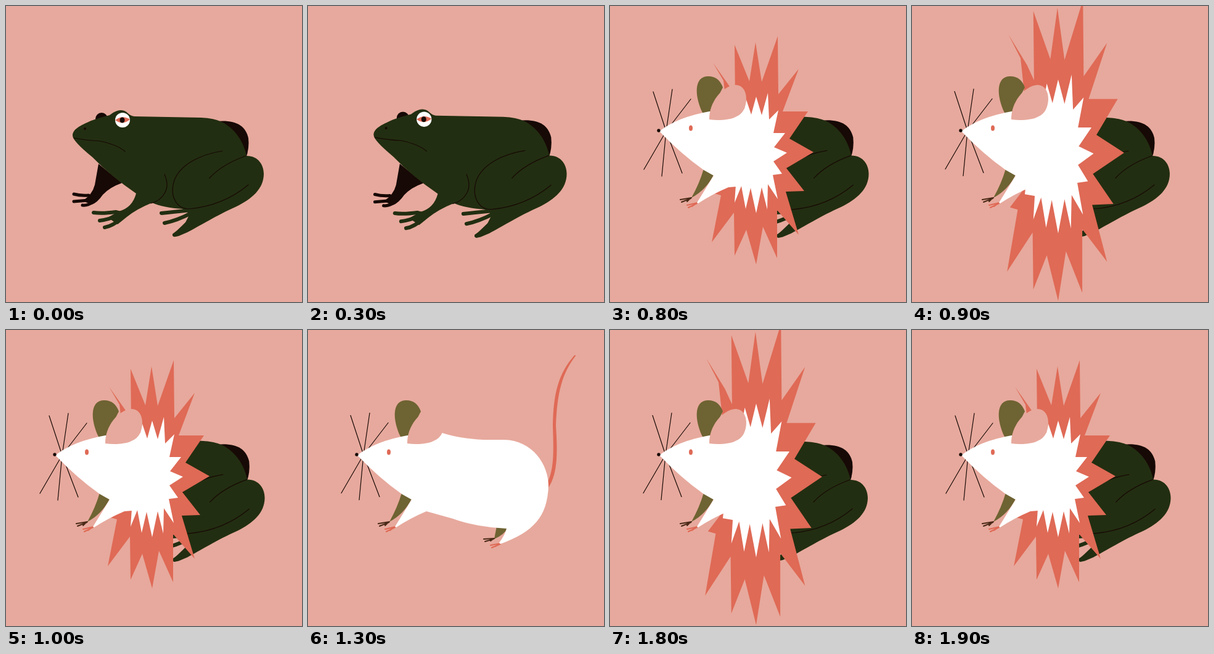
Write an HTML page that moves like this. It is 480 px wide and 480 px high and loops after 2 s.

```html
<!DOCTYPE html>
<html lang="en">
<head>
<meta charset="utf-8">
<title>Frog and mouse</title>
<style>
  html, body { margin: 0; height: 100%; overflow: hidden; background: #e7a99d; }
  svg { display: block; width: 100%; height: 100%; }
  .skin { fill: #222e11; }
  .dark { fill: #170905; }
  .olive { fill: #6e6332; }
  .red { fill: #df6a56; }
  .white { fill: #fff; }
  .pink { fill: #e7a99d; }
  .line { fill: none; stroke: #170905; stroke-width: 1.2; stroke-linecap: round; }
  .toes { fill: none; stroke-width: 6; stroke-linecap: round; stroke-linejoin: round; }
  .paw { fill: none; stroke-width: 2; stroke-linecap: round; }
</style>
</head>
<body>
<svg viewBox="0 0 480 480">
  <clipPath id="right"><rect x="270" width="210" height="480"/></clipPath>

  <g id="frogClip">
    <g id="frog">
      <circle class="dark" cx="155" cy="183" r="10"/>
      <path class="dark" d="M340 187C372 184 388 193 393 214Q395 230 389 247L350 240Z"/>
      <path class="dark" d="M150 256L188 287Q168 294 157 306Q148 319 139 322L124 316Q140 306 144 290Z"/>
      <path class="toes" stroke="#170905" style="stroke-width:5" d="M110 305Q121 308 134 307M110 317L134 315M124 323Q132 324 141 318"/>

      <path class="skin" d="M108 210C108 200 120 194 138 186Q155 180 168 177C177 170 182 169 187 169C197 169 198 178 208 179L316 181Q338 182 350 188C370 198 385 218 390 243C410 243 418 259 418 272C418 297 398 313 374 325C342 339 312 358 294 367L280 373Q270 376 270 371L291 351L298 337L286 329Q255 327 237 319Q212 329 196 342L181 354L165 343L183 333Q205 327 211 304Q170 276 140 245Q108 219 108 210Z"/>
      <path class="toes" stroke="#222e11" d="M142 335Q156 337 178 334L190 337M152 348Q164 347 187 338M160 359Q173 357 189 343"/>
      <path class="toes" stroke="#222e11" d="M252 336Q270 334 300 331M257 352Q277 348 300 336M273 371Q288 362 300 344"/>
      <path class="line" d="M110 214Q130 218 152 219Q181 225 193 236M257 273Q265 291 257 304Q250 316 235 320M351 235C315 241 285 256 274 280C264 306 275 329 297 329Q352 324 393 290M330 279Q350 257 389 243"/>
      <circle class="dark" cx="128" cy="199" r="2"/>
      <circle class="white" cx="189" cy="185" r="12"/>
      <path class="red" d="M177 185Q189 176 201 184Q189 194 177 185"/>
      <ellipse class="dark" cx="188.500" cy="185" rx="4" ry="4.500"/>
    </g>
  </g>

  <g id="burst">
    <polygon class="red" points="190,170 184,121 167,92 193,129 203,148 202,63 226,122 236,59 246,123 272,49 273,143 306,102 280,171 321,171 291,215 330,237 286,263 315,300 285,301 306,371 271,331 271,409 248,358 237,419 221,363 202,405 201,335 165,383 180,307 169,304 190,280"/>
    <polygon class="white" points="205,172 216,175 221,152 229,176 237,147 246,177 256,141 258,184 273,169 265,206 284,206 266,229 287,238 265,252 279,272 264,274 272,313 256,289 255,330 246,294 237,336 228,295 220,329 213,292 202,319 204,290 190,288"/>
  </g>

  <g id="mouse">
    <path id="whiskers" class="line" d="M70 139L91 203L101 135M131 151L91 203L55 265M84 276L91 203L117 271"/>
    <path class="olive" d="M150 173C137 146 136 115 158 114Q176 113 183 132L162 173ZM152 264L168 274Q155 299 132 311Q145 288 152 264"/>
    <path class="paw" stroke="#4a2a18" d="M132 311L114 314M131 312L116 318M130 312L125 317"/>
    <path class="paw" stroke="#df6a56" d="M142 319L125 323M141 320L127 327M140 320L133 325"/>
    <path class="white" d="M80 203Q110 180 161 171L218 167L222 180L225 290L204 293L192 294Q166 305 143 320L141 319L168 275L152 266Q115 240 80 203Z"/>
    <g id="rear">
      <path class="red" d="M389 246C400 222 398 190 397 155C398 102 406 71 432 41Q434 40 434 42C412 70 404 102 402 155C404 190 407 232 389 257Z"/>
      <path class="olive" d="M306 318L324 321Q318 332 302 339Z"/>
      <path class="paw" stroke="#4a2a18" d="M302 338L285 339M301 339L287 343M300 339L296 342"/>
      <path class="paw" stroke="#df6a56" d="M313 346L296 349M312 347L298 353M310 347L304 351"/>
      <path class="white" d="M205 165L218 167Q245 176 285 178H318C364 179 390 218 390 253C388 303 366 327 312 347L310 345Q319 333 322 322Q270 319 235 306L192 294Z"/>
    </g>
    <path class="pink" d="M161 184C160 157 182 129 204 128C221 129 225 151 217 168C209 184 183 187 161 184Z"/>
    <circle class="dark" cx="79" cy="202" r="2.700"/>
    <ellipse class="red" cx="131" cy="198" rx="3" ry="4.500"/>
  </g>
</svg>
<script>
  // One letter per 100 ms: Frog, Hybrid, Mouse; lower case is the second drawing of a pose.
  const poses = 'FFFfFfFFHhHhMmMmMHhH';
  const $ = id => document.getElementById(id);
  const show = (id, on) => $(id).setAttribute('display', on ? 'inline' : 'none');
  const scaleAbout = (x, y, sx, sy) => `translate(${x} ${y}) scale(${sx} ${sy}) translate(${-x} ${-y})`;

  function draw(time) {
    const letter = poses[Math.floor(time % 2000 / 100)];
    const pose = letter.toUpperCase();
    const alt = letter !== pose;
    const hybrid = pose === 'H';

    show('frog', pose !== 'M');
    show('mouse', pose !== 'F');
    show('burst', hybrid);
    show('rear', pose === 'M');

    $('frogClip').setAttribute('clip-path', hybrid ? 'url(#right)' : 'none');
    $('frog').setAttribute('transform', alt !== hybrid ? scaleAbout(263, 270, 1.01, 1.015) : '');
    $('burst').setAttribute('transform', hybrid && alt ? scaleAbout(237, 234, 1.15, 1.32) : '');
    $('whiskers').setAttribute('transform', alt ? 'translate(-1 -.5)' : '');
  }

  const start = performance.now();
  function tick() {
    draw(performance.now() - start);
    requestAnimationFrame(tick);
  }
  tick();
</script>
</body>
</html>
```
